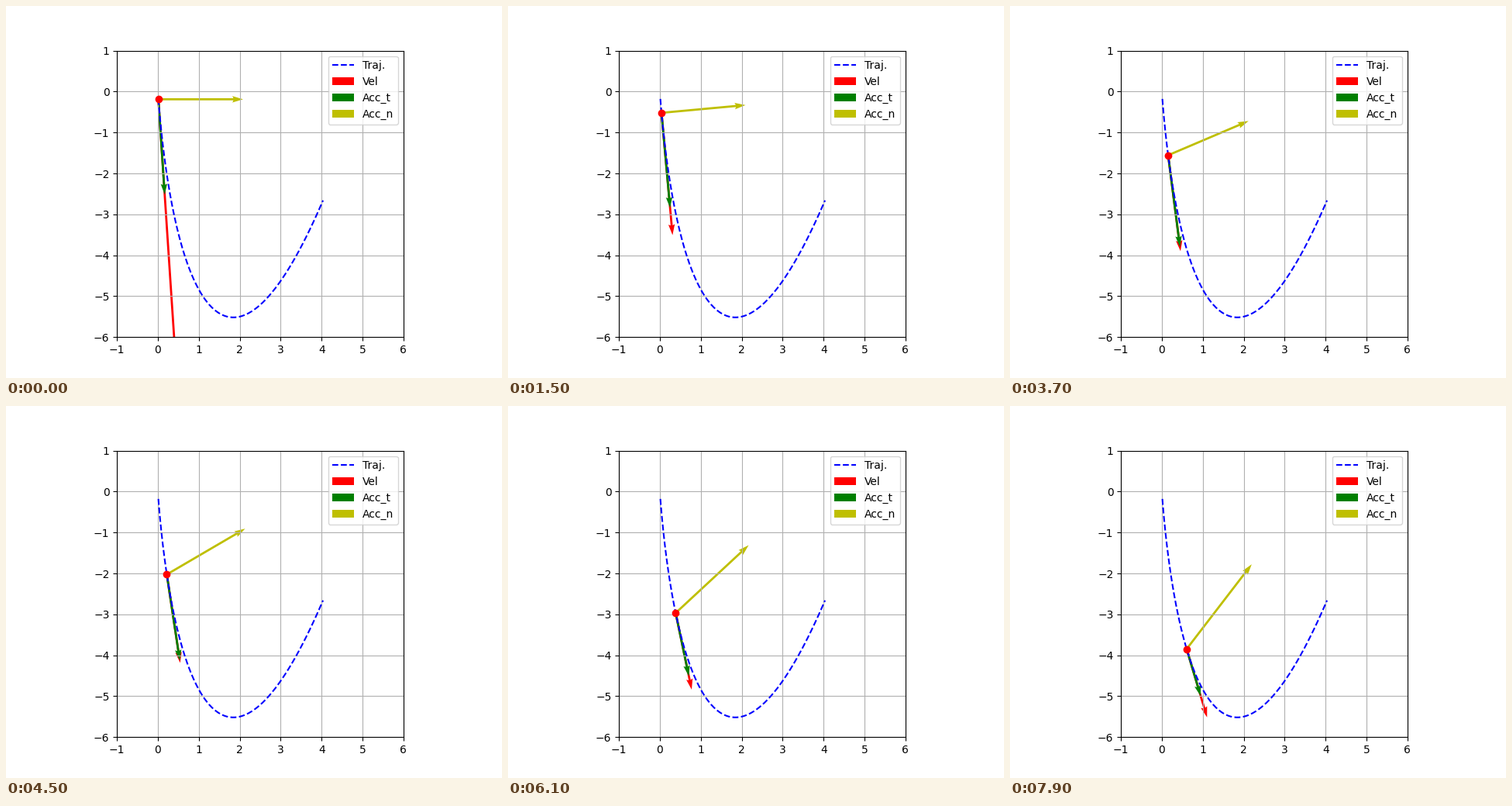
Recreate the animation shown at these times as a matplotlib script. Size 640 by 480 pixels, loop 8 s.

```python
import numpy as np
import matplotlib.pyplot as plt
from matplotlib.animation import FuncAnimation
from numpy.polynomial import Polynomial

FRAMES = 80
INTERVAL = 100

# Path as polynomials in u, the square root of time
path_x = Polynomial([0.0115, 0.0247, 0.2, 0, 0.0785])
path_y = Polynomial([-0.18, -0.406, -2.206, 0, 0.1553, 0, 0.0292])
U_END = 5.945 ** 0.5


def ease(i):
    return 1.5 * np.sin(np.pi * (i + 1) / 240)


def pose(i):
    """Position, velocity, tangential and normal acceleration."""
    u, w = ease(i), i / (FRAMES - 1)
    place = np.array([path_x(u), path_y(u)])
    lean = -path_x.deriv()(u) / path_y.deriv()(u)
    tangent = np.array([lean, -1])
    speed = 3.52 - 3.1 * w + 1.25 * w**2 + 3 / (1 + i)**2
    push = 1.08 + 1.25 / (1 + np.exp(10 * (w - 0.72)))
    normal = np.array([2.07 - 0.48 * w**2,
                       0.2 * w + 4.72 * w**2 - 2.85 * w**3])
    return place, speed * tangent, push * tangent, normal


fig = plt.figure(figsize=(6.4, 4.8), dpi=100)
ax = fig.add_subplot(1, 1, 1)
ax.set(xlim=(-1, 6), ylim=(-6, 1))
ax.set_aspect("equal")
ax.grid(True)

u = np.linspace(0, U_END, 400)
ax.plot(path_x(u), path_y(u), "b--", label="Traj.")
dot, = ax.plot([], [], "ro")


def arrow(color, label):
    return ax.quiver([0], [0], [1], [0], color=color, label=label,
                     angles="xy", scale_units="xy", scale=1)


arrows = [arrow("r", "Vel"), arrow("g", "Acc_t"), arrow("y", "Acc_n")]
ax.legend(loc="upper right")


def update(i):
    place, *vectors = pose(i)
    dot.set_data(place[:1], place[1:])
    for item, (dx, dy) in zip(arrows, vectors):
        item.set_offsets([place])
        item.set_UVC([dx], [dy])
    return [dot, *arrows]


anim = FuncAnimation(fig, update, frames=FRAMES, interval=INTERVAL,
                     repeat=True, repeat_delay=0, blit=False)
plt.show()
```
